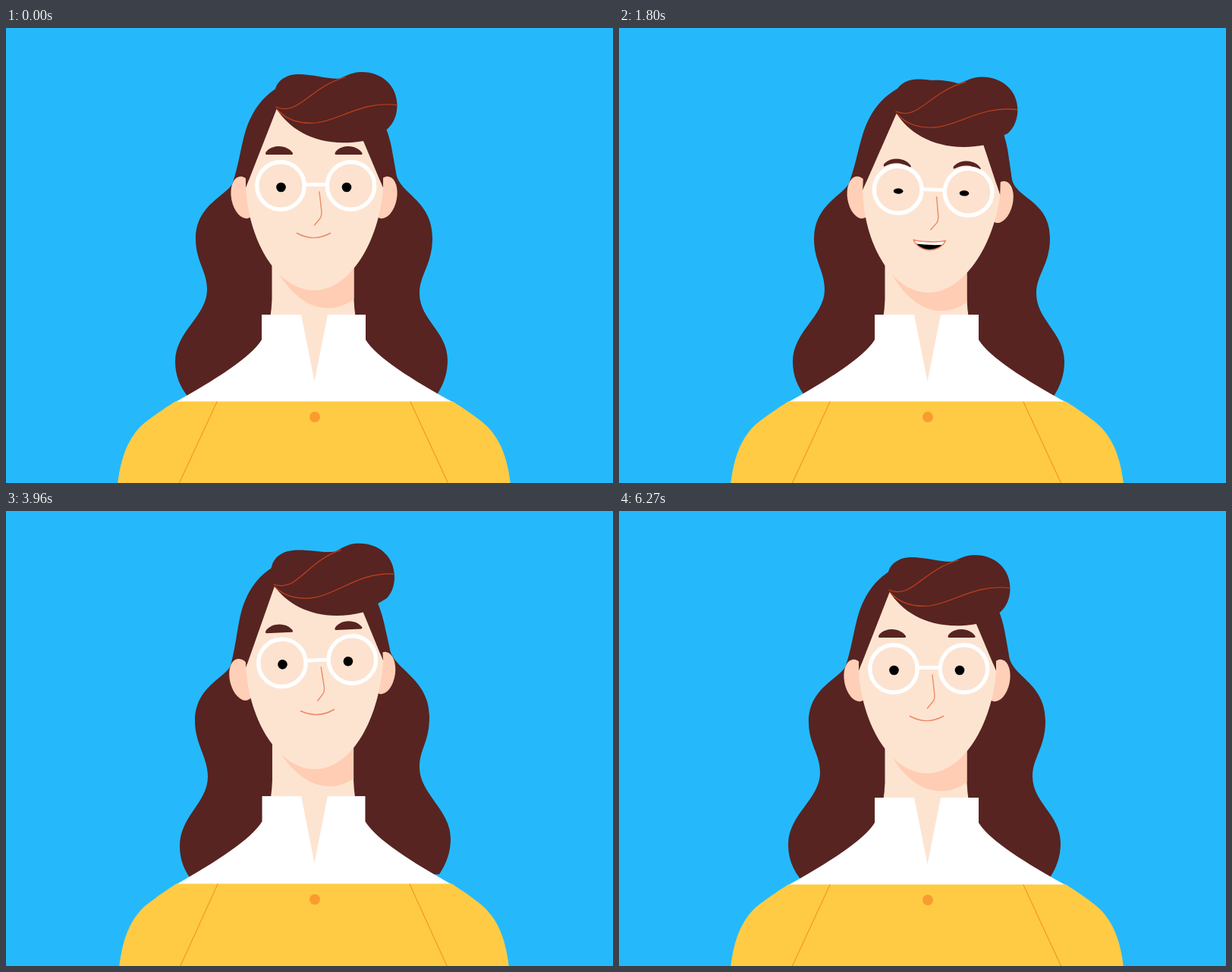
An HTML page with a canvas that plays this animation: 800x600 px, repeating every 6300 ms.

```html
<!DOCTYPE html>
<html lang="en">
<head>
<meta charset="utf-8">
<title>Talking portrait</title>
<style>
  html, body { margin: 0; width: 100%; height: 100%; overflow: hidden; background: #25b9fb; }
  canvas { display: block; }
</style>
</head>
<body>
<canvas id="stage" width="800" height="600"></canvas>
<script>
const ctx = document.getElementById('stage').getContext('2d');
const LOOP = 6300, STEP = 30;
const HAIR = '#572421', SKIN = '#fde4d1', BLUSH = '#ffcdb4', LIP = '#ec8a68';

// head: x, y, degrees, turn x, turn y    brow: drop, arch    fringe: degrees
// body: scale x, scale y     mouth: half width, y, upper depth, lower depth
// left, right: x, y shifts of the upper, middle and lower hair wave
const still = [0, 0, 0, 0, 0, 0];
const poses = {
  rest:  { head: [0, 0, 0, 0, 0], brow: [0, 0], fringe: [0], body: [1, 1], mouth: [22, 60.5, 6, 6],
           left: still, right: still },
  oh:    { head: [3.5, -6, 1.4, 1, -7], brow: [0, 0], fringe: [-1.9], body: [1, 1.009], mouth: [8.5, 71, -2, 7.5],
           left: [4, -6, 2, -4, 1, 0], right: [3, -4, 2, -2, 1, -1] },
  grin:  { head: [4, 3, 1.9, 1.5, 3.5], brow: [11, 5], fringe: [-1.9], body: [1, 1], mouth: [21, 64, 2, 13],
           left: [7, 0, 6, 0, 6, 0], right: [6, 0, 5, 0, 5, 2] },
  nod:   { head: [-3, 12.5, -0.6, -4, 13], brow: [11, 6], fringe: [0.3], body: [1.0077, 0.991], mouth: [20.5, 65, 1.5, 15],
           left: [-4, 4, -4, 5, -4, 2], right: [4, 2, 4, 0, 7, -1] },
  tall:  { head: [-2, -5.5, -2.7, 4.8, -4], brow: [1, 0], fringe: [-1.4], body: [0.992, 1.009], mouth: [22, 62.5, 5.5, 5.5],
           left: [-1, -1, 1, 5, 6, 2], right: [-4, -6, 0, -12, 4, -6] },
  quiet: { head: [-3, 1, -1.8, 0.9, 1], brow: [4.7, 0.5], fringe: [3.8], body: [0.998, 1.002], mouth: [17.5, 68.5, 0.5, 6],
           left: [-8, -3, -9, 0, -9, 0], right: [-9, -1, -10, 0, -11, 2] }
};

// time, pose, strength
const cues = [
  [0, 'rest', 1], [40, 'rest', 1], [720, 'oh', 1], [1060, 'oh', 1], [1640, 'grin', 1],
  [2400, 'grin', 1], [3090, 'nod', 1], [3220, 'nod', 1.2], [3710, 'tall', 1.08],
  [3960, 'tall', 1], [4160, 'tall', 1], [4850, 'quiet', 1], [5220, 'quiet', 1],
  [6240, 'rest', 1], [LOOP, 'rest', 1]
];
const times = cues.map(c => c[0]);

// Smooth curve through keys that never swings past them.
function curve(ts, vs, t) {
  const slope = i => (vs[i + 1] - vs[i]) / (ts[i + 1] - ts[i]);
  const tangent = i => {
    if (i === 0 || i === ts.length - 1) return 0;
    const a = slope(i - 1), b = slope(i);
    return a * b <= 0 ? 0 : 2 * a * b / (a + b);
  };
  let i = 0;
  while (i < ts.length - 2 && t >= ts[i + 1]) i++;
  const d = ts[i + 1] - ts[i], u = Math.min(1, Math.max(0, (t - ts[i]) / d)), v = 1 - u;
  return vs[i] * v * v * (1 + 2 * u) + vs[i + 1] * u * u * (3 - 2 * u)
    + d * u * v * (tangent(i) * v - tangent(i + 1) * u);
}

function poseAt(t) {
  const out = {};
  for (const part in poses.rest) {
    out[part] = poses.rest[part].map((base, k) =>
      curve(times, cues.map(([, name, s]) => base + (poses[name][part][k] - base) * s), t));
  }
  return out;
}

const eyeOpen = t => curve([0, 1680, 1800, 1850, 1970, LOOP], [1, 1, 0.58, 0.15, 1, 1], t);
const rad = deg => deg * Math.PI / 180;
const spin = (x, y, deg) => {
  const c = Math.cos(rad(deg)), s = Math.sin(rad(deg));
  return [x * c - y * s, x * s + y * c];
};

function fill(path, color) {
  ctx.fillStyle = color;
  ctx.fill(typeof path === 'string' ? new Path2D(path) : path);
}

function line(path, color, width) {
  ctx.strokeStyle = color;
  ctx.lineWidth = width;
  ctx.stroke(typeof path === 'string' ? new Path2D(path) : path);
}

function oval(x, y, rx, ry, color, turn = 0) {
  ctx.beginPath();
  ctx.ellipse(x, y, rx, ry, turn, 0, Math.PI * 2);
  ctx.fillStyle = color;
  ctx.fill();
}

function inside(place, draw) {
  ctx.save();
  place();
  draw();
  ctx.restore();
}

function backHair(p) {
  const [x, y, deg, px] = p.head;
  const root = (u, v) => {
    const [a, b] = spin(u, v, deg);
    return [406 + x + a, 223.5 + y + b];
  };
  const at = (side, i, u, v) => [u + side[i], v + side[i + 1]];
  const [lx, ly] = root(-107, -20), [rx, ry] = root(108 - px, -33);
  const [ax, ay] = at(p.left, 0, 250, 278), [bx, by] = at(p.left, 2, 265, 345), [cx, cy] = at(p.left, 4, 223, 440);
  const [dx, dy] = at(p.right, 0, 562, 277), [ex, ey] = at(p.right, 2, 545, 350), [fx, fy] = at(p.right, 4, 582, 438);
  const h = new Path2D();
  h.moveTo(lx, ly);
  h.bezierCurveTo(lx - 6, ly + 17, ax, ay - 46, ax, ay);
  h.bezierCurveTo(ax, ay + 30, bx, by - 25, bx, by);
  h.bezierCurveTo(bx, by + 35, cx, cy - 40, cx, cy);
  h.bezierCurveTo(cx, cy + 18, cx + 6, cy + 33, cx + 18, cy + 48);
  h.lineTo(fx - 15, fy + 47);
  h.bezierCurveTo(fx - 5, fy + 32, fx, fy + 17, fx, fy);
  h.bezierCurveTo(fx, fy - 38, ex, ey + 35, ex, ey);
  h.bezierCurveTo(ex, ey - 25, dx, dy + 35, dx, dy);
  h.bezierCurveTo(dx, dy - 51, rx + 3, ry + 28, rx, ry);
  h.closePath();
  fill(h, HAIR);
}

function cap(px) {
  fill('M-107,-20 C-97,-50 -95,-82 -84,-104 C-66,-142 -34,-158 5,-158 '
    + `C65,-158 ${97 - px},-110 ${104.5 - px},-53 L${108 - px},-33 L60,30 H-60 Z`, HAIR);
}

const JAW = 'C-86,58 -48,122.5 0,122.5 C47,122.5 86,58 ';
const NECK = new Path2D('M350.5,285 V358 Q350,370 348.5,380 L380,470 H430 L460.5,380 Q459,370 458.5,358 V285 Z');

function torso() {
  fill('M337,378 H389 L406.5,466 L424,378 H474 V411 C488,434 535,464 592,495 H220 C276,464 323,434 337,411 Z', '#fff');
  fill('M223,492.5 H589 C604,502 620,513 630.5,522 C652,541 661,568 665,602 '
    + 'H147 C151,568 160,541 181,522 C192,513 208,502 223,492.5 Z', '#ffcb44');
  line('M278,493 L227.5,602 M533,493 L583.5,602', '#f59a2c', 1.3);
  oval(407, 513, 7, 7, '#f99c2f');
}

function brow(x, y, arch) {
  inside(() => ctx.translate(x, y), () =>
    fill(`M-17,1 Q-19,0 -17,-3 C-12,-8.5 -6,-10 0,-10 C8,-10 15,-6 18,-1 Q18.5,1 16,1 Q0,${1 - 2 * arch} -17,1 Z`, HAIR));
}

function mouth([w, y, up, low]) {
  const gap = low - up;
  const k = w * (0.36 + 0.25 * Math.min(1, gap / 8)), hi = up * 4 / 3, lo = low * 4 / 3;
  const lips = new Path2D(`M${-w},0 C${-k},${hi} ${k},${hi} ${w},0 C${k},${lo} ${-k},${lo} ${-w},0 Z`);
  ctx.save();
  ctx.translate(0, y);
  if (gap > 0.4) {
    fill(lips, '#000');
    ctx.save();
    ctx.clip(lips);
    const gum = up + gap * 0.38;
    fill(`M${-w},-9 H${w} V${gum - 1} Q0,${gum + 1} ${-w},${gum - 1} Z`, '#fff');
    ctx.restore();
  }
  line(lips, LIP, 1.6);
  ctx.restore();
}

// Drawn from the hairline peak
function fringe() {
  fill('M0,0 C17.5,28 56.5,52 114,42 L146,26 C154.5,18 158.5,7 158.5,-5 C158.5,-31 138.5,-49 111.5,-49 '
    + 'C98.5,-49 90.5,-43 82.5,-40.5 C68.5,-39 48.5,-46 28.5,-46 C14.5,-46 4.5,-40 -0.5,-31 L-9.5,-7 Z', HAIR);
  line('M-1,-3 C28.5,10 42.5,-29 90,-42', '#c3401a', 1.2);
  line('M0,0 C12.5,15 32.5,20 52.5,18 C84.5,14 112.5,-11 158,-5.5', '#c3401a', 1.2);
}

function features(p, open) {
  const [drop, arch] = p.brow;
  inside(() => {
    ctx.translate(-48.5, -103);
    ctx.rotate(rad(p.fringe[0]));
  }, fringe);
  brow(-45.5, -44 + drop, arch);
  brow(46, -44 + drop, arch);
  for (const x of [-43.5, 49]) {
    oval(x, -2, 31, 31, '#fce2cf');
    line(`M${x - 31.2},-2 a31.2,31.2 0 1 1 62.4,0 a31.2,31.2 0 1 1 -62.4,0 Z`, '#fff', 5.4);
  }
  line('M-12,-3.5 H18', '#fff', 4.8);
  for (const x of [-43, 43.5]) oval(x, 0, 6.3, 6.3 * open, '#000');
  line('M7.5,6 L10.3,31 Q11,37 8.5,41 L1,50', LIP, 1.4);
  mouth(p.mouth);
}

function draw(t) {
  const p = poseAt(t);
  const [x, y, deg, px, py] = p.head;
  const ox = px - 0.5, oy = py - 13.5;
  const sx = 1 + 0.0015 * Math.max(0, py), sy = 1 - 0.0027 * Math.max(0, py);
  const onBody = () => {
    ctx.translate(406, 600);
    ctx.scale(...p.body);
    ctx.translate(-406, -600);
  };
  const onHead = () => {
    ctx.translate(406 + x, 223.5 + y);
    ctx.rotate(rad(deg));
  };
  const onFace = () => {
    ctx.translate(ox, oy);
    ctx.scale(sx, sy);
  };
  // Hairline corners in head space
  const [qx, qy] = spin(113.5, 41, p.fringe[0]);
  const peak = [ox - 48.5 * sx, oy - 104 * sy];
  const part = [ox + (qx - 48.5) * sx, oy + (qy - 103) * sy];
  const tipL = [-90 + px * 0.6, -12.5 + py * 0.8], tipR = [91 + px * 0.6, -12.5 + py * 0.9];

  ctx.fillStyle = '#25b9fb';
  ctx.fillRect(0, 0, 800, 600);
  backHair(p);
  inside(onHead, () => cap(px));

  ctx.save();
  onBody();
  fill(NECK, SKIN);
  ctx.clip(NECK);
  ctx.setTransform(1, 0, 0, 1, 0, 0);
  onHead();
  ctx.translate(18, 23.5);
  fill(`M-90,-12 ${JAW} 91,-12 Z`, BLUSH);
  ctx.restore();
  inside(onBody, torso);

  inside(onHead, () => {
    oval(-93, 0, 16, 28, '#ffcfb7', -0.2);
    oval(93, 0, 16, 28, '#ffcfb7', 0.2);
    fill(`M${peak} L${tipL} v-34 Z M${part} L${tipR} v-34 Z`, HAIR);
    fill(`M${peak} L${tipL} ${JAW} ${tipR} L${part} Z`, SKIN);
    inside(onFace, () => features(p, eyeOpen(t)));
  });
}

ctx.lineCap = 'round';
ctx.lineJoin = 'round';
const start = performance.now();
function tick() {
  const t = (performance.now() - start) % LOOP;
  draw(Math.floor(t / STEP) * STEP);
  requestAnimationFrame(tick);
}
tick();
</script>
</body>
</html>
```
